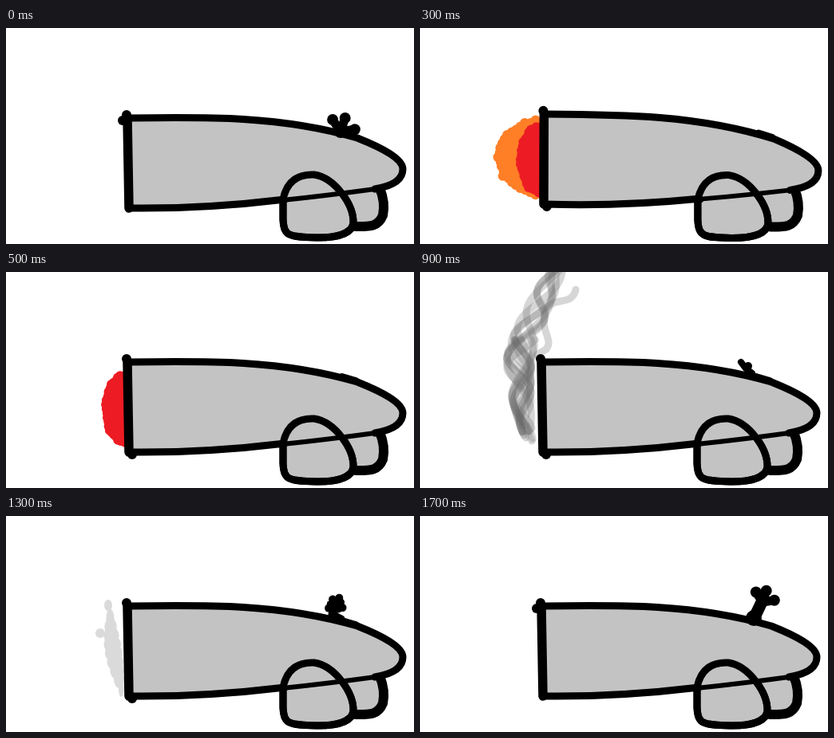
Recreate the animation shown at these times as an HTML page with a canvas. Size 511x271 px, loop 1.9 s.

```html
<!DOCTYPE html>
<html lang="en">
<head>
<meta charset="utf-8">
<title>Cannon</title>
<style>
  html, body { margin: 0; width: 100%; height: 100%; overflow: hidden; background: #fff; }
  canvas { display: block; }
</style>
</head>
<body>
<canvas id="stage" width="511" height="271"></canvas>
<script>
const ctx = document.getElementById('stage').getContext('2d');
const GRAY = '#c3c3c3', RED = '#ed1c24', ORANGE = '#ff7f27', YELLOW = '#fff200';
const LOOP = 1900;

const topAndNose = 'M152,113 C250,111.5 345,110 440,138 C470,150 497,164 497,177 C497,192 480,199 462,202';
const underside = 'C360,216 250,228 155,226';
const frontWheel = 'M347,215 C352,190 368,183 386,184 C412,188 436,222 435,245 C433,259 412,263 390,263 C355,262 348,262 347,240 Z';
const backWheel = 'M468,201 C474,215 474,225 472,235 C466,250 455,249 438,249';

// Repeatable random number from 0 to 1.
const random = seed => {
  const value = Math.sin(seed * 12.9898) * 43758.5453;
  return value - Math.floor(value);
};

function stroke(path, width, color = '#000') {
  ctx.lineWidth = width;
  ctx.strokeStyle = color;
  ctx.stroke(new Path2D(path));
}

function fill(path, color = GRAY) {
  ctx.fillStyle = color;
  ctx.fill(new Path2D(path));
}

function ellipse(x, y, rx, ry = rx, color = '#000') {
  ctx.fillStyle = color;
  ctx.beginPath();
  ctx.ellipse(x, y, rx, ry, 0, 0, 2 * Math.PI);
  ctx.fill();
}

// Half ellipse bulging to the left, with a scalloped edge.
function flame(x, y, rx, ry, color) {
  const outline = new Path2D();
  for (let i = 0; i <= 24; i++) {
    const angle = Math.PI * (0.5 + i / 24);
    const reach = 0.95 + 0.1 * random(i + rx);
    const px = x + rx * reach * Math.cos(angle);
    const py = y + ry * reach * Math.sin(angle);
    outline.lineTo(px, py);
    ellipse(px, py, 6, 6, color);
  }
  ctx.fillStyle = color;
  ctx.fill(outline);
}

function wheels(kick) {
  ctx.save();
  ctx.translate(3 * kick, 2 * kick);
  fill(backWheel + ' L425,208 L468,199 Z');
  stroke(backWheel, 12);
  fill(frontWheel);
  stroke(frontWheel, 9);
  stroke('M350,214 C353,193 366,186 386,185 L373,188 L357,199', 10);
  ctx.restore();
}

// A kick of 1 tips the barrel fully nose down.
function cannon(kick, drawFuse, primed = false) {
  wheels(kick);
  ctx.save();
  ctx.translate(397, 270);
  ctx.rotate(0.07 * kick);
  ctx.translate(-397, -270);
  fill(topAndNose + underside + 'Z');
  stroke(topAndNose, 9);
  stroke('M462,202 ' + underside, 6);
  stroke('M155,226 Q250,227 345,215.5', 9);
  stroke('M152,113 L154,226', 11.5);
  ellipse(151, 109, 6);
  if (primed) ellipse(146, 116, 6);
  else {
    ellipse(158, 229, 6);
    stroke('M421,131 L438,136', 8);
  }
  if (drawFuse) drawFuse();
  ctx.restore();
  // The front wheel stays in front of the tipped barrel.
  ctx.save();
  ctx.translate(3 * kick, 2 * kick);
  stroke(frontWheel, 9);
  ctx.restore();
}

function sprig(x, y, reach) {
  for (const angle of [-2.15, -1.25, -0.15]) {
    const tipX = x + reach * Math.cos(angle), tipY = y + reach * Math.sin(angle);
    stroke(`M${x},${y} L${tipX},${tipY}`, 11);
    ellipse(tipX, tipY, 7);
  }
}

const budFuse = () => { sprig(419, 130, 18); ellipse(419, 130, 8); };

function tallFuse() {
  stroke('M418,129 L428,108', 15);
  ellipse(418, 128, 10);
  sprig(429, 108, 15);
}

function curledFuse() {
  for (let i = 0; i < 11; i++) {
    const reach = 3.2 * Math.sqrt(i), angle = 2.4 * i;
    ellipse(413 + reach * Math.cos(angle), 112 + reach * Math.sin(angle), 5);
  }
  stroke('M408,123 L420,129', 9);
}

function stubFuse() {
  stroke('M402,113 L408,121 L416,127', 8);
  ellipse(411, 118, 5);
}

// Centre line of the rising smoke.
const plume = y => y < 110
  ? 124 + 46 * ((110 - y) / 110) ** 1.3
  : 124 + 14 * ((y - 110) / 105) ** 2;

function smoke(seed) {
  const color = 'rgba(105,105,105,.27)';
  for (let i = 0; i < 13; i++) {
    const phase = 6.3 * random(i + seed), wave = 12 + 10 * random(i + seed + 40);
    const start = i % 2 ? 85 : -8, end = 195 + 20 * random(i + seed + 80);
    let path = 'M';
    for (let y = start; y <= end; y += 4) {
      const spread = 16 * Math.sin(Math.PI * (y + 60) / 300);
      path += ` ${plume(y) + spread * Math.sin(y / wave + phase)},${y}`;
    }
    stroke(path, 9, color);
  }
  stroke('M195,22 C190,45 165,28 157,50 C150,75 168,85 158,97 L146,104', 9, color);
}

function fadingSmoke() {
  const color = '#dadada';
  ellipse(128, 112, 5, 7, color);
  ellipse(118, 147, 6, 6, color);
  for (let y = 128; y < 220; y += 11)
    ellipse(plume(y) + 6, y, 11 * Math.sin(Math.PI * (y - 110) / 118), 11, color);
}

const scenes = [
  [0, () => cannon(0, budFuse, true)],
  [200, () => {
    flame(122, 154, 55, 46, YELLOW);
    flame(156, 153, 47, 49, ORANGE);
    flame(158, 155, 21, 42, RED);
    cannon(1);
  }],
  [300, () => {
    flame(152, 162, 54, 46, ORANGE);
    flame(152, 165, 25, 42, RED);
    cannon(0.3);
  }],
  [500, () => { flame(149, 172, 23, 42, RED); cannon(0); }],
  [700, () => { smoke(7); cannon(0); }],
  [900, () => { smoke(1); cannon(0, stubFuse); }],
  [1300, () => { fadingSmoke(); cannon(0, curledFuse); }],
  [1500, () => cannon(0, tallFuse, true)]
];

function draw(time) {
  ctx.fillStyle = '#fff';
  ctx.fillRect(0, 0, 511, 271);
  ctx.lineCap = ctx.lineJoin = 'round';
  scenes.findLast(([start]) => time >= start)[1]();
}

const begin = performance.now();
function tick() {
  draw((performance.now() - begin) % LOOP);
  requestAnimationFrame(tick);
}
tick();
</script>
</body>
</html>
```
